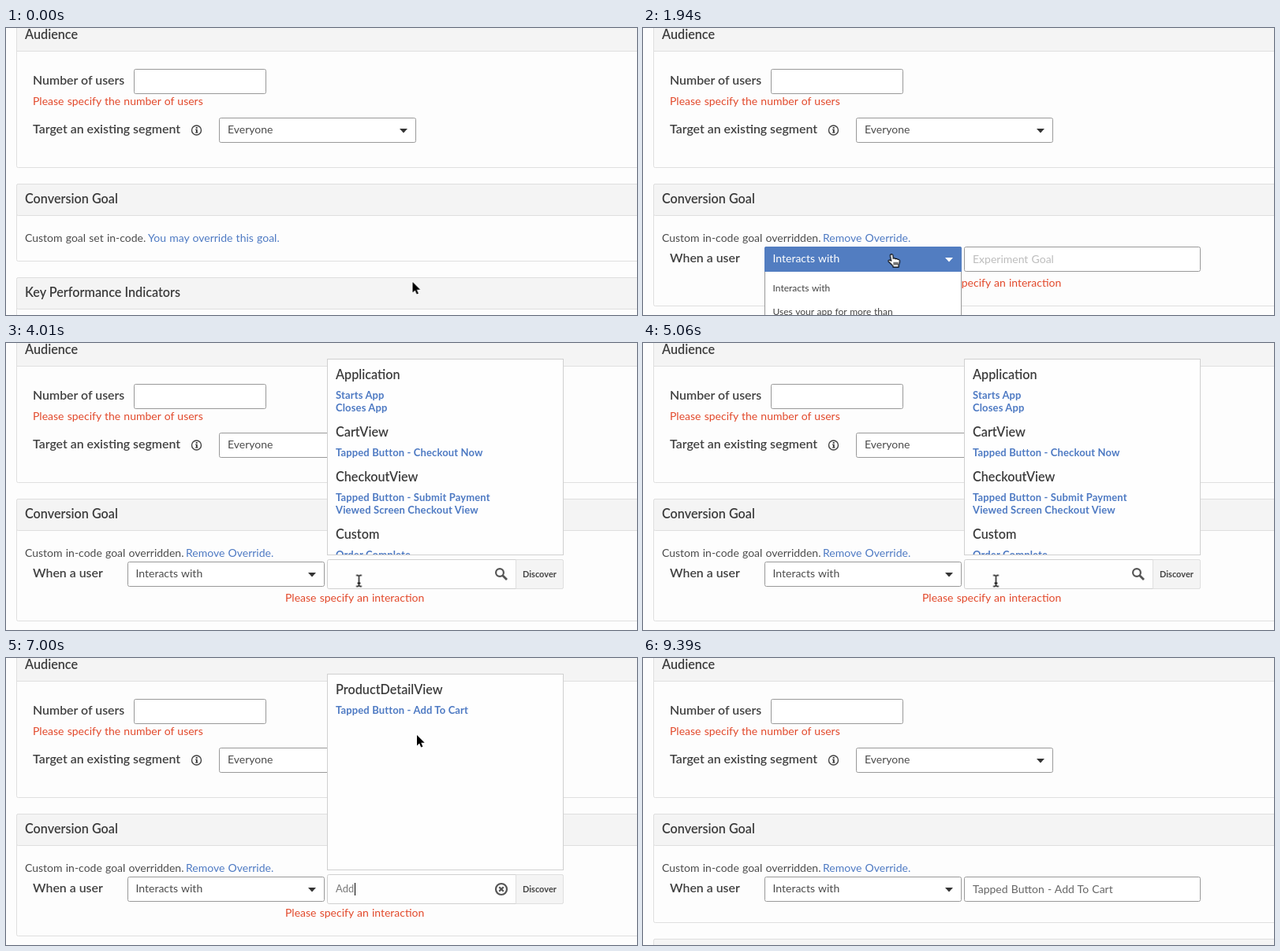
An HTML page for the animation above (9.8 s loop, 800 by 365 pixels).

```html
<!DOCTYPE html>
<html lang="en">
<head>
<meta charset="utf-8">
<title>Choosing a conversion goal</title>
<style>
html, body { margin: 0; width: 100%; height: 100%; overflow: hidden; background: #fdfdfd; }
svg { display: block; width: 800px; height: 365px; }

text { font: 14px Lato, "Open Sans", sans-serif; word-spacing: .6px; fill: #4c4c4c; white-space: pre; }
.head { font-size: 16.2px; font-weight: 600; word-spacing: 0; fill: #3c3c3c; }
.label { font-size: 15.9px; font-weight: 600; word-spacing: 0; fill: #404040; }
.error { fill: #e2492b; }
.link { fill: #4e7ac3; }
.hint { fill: #bdbdbd; }
.value { fill: #666; }
.item { font-size: 13px; font-weight: 700; letter-spacing: .14px; word-spacing: 0; fill: #4e7ac3; }
.option { font-size: 12px; fill: #444; }
.typed { font-size: 13px; fill: #777; }
.small { font-size: 11px; font-weight: 700; fill: #444; }
.panel { fill: #fdfdfd; stroke: #dfdfdf; }
.bar { fill: #f4f4f4; stroke: #dfdfdf; }
.box { fill: #fff; stroke: #999; }
.pop { fill: #fefefe; stroke: #d0d0d0; }
.ink { fill: #333; }
.icon { fill: none; stroke: #555; stroke-width: 2.2; }
.arrow path { fill: #000; stroke: #fff; stroke-width: 2; paint-order: stroke; stroke-linejoin: round; }

/* Everything changes in hard steps over one 9.8 s loop. */
.t, .m { animation: 9.8s step-end infinite; }
.t { opacity: 0; }

.prompt { animation-name: prompt; }
@keyframes prompt { 0% { opacity: 1 } 10.612% { opacity: 0 } }
.custom { animation-name: custom; }
@keyframes custom { 10.612% { opacity: 1 } 100% { opacity: 1 } }
.missing { animation-name: missing; }
@keyframes missing { 10.612% { opacity: 1 } 79.081% { opacity: 0 } }
.blank { animation-name: blank; }
@keyframes blank { 10.612% { opacity: 1 } 40.918% { opacity: 0 } }
.menu { animation-name: menu; }
@keyframes menu { 19.795% { opacity: 1 } 33.469% { opacity: 0 } }
.search { animation-name: search; }
@keyframes search { 40.918% { opacity: 1 } 77.551% { opacity: 0 } }
.all { animation-name: all; }
@keyframes all { 40.918% { opacity: 1 } 56.224% { opacity: 0 } }
.match { animation-name: match; }
@keyframes match { 56.224% { opacity: 1 } 77.551% { opacity: 0 } }
.lens { animation-name: lens; }
@keyframes lens { 40.918% { opacity: 1 } 53.163% { opacity: 0 } }
.clear { animation-name: clear; }
@keyframes clear { 53.163% { opacity: 1 } 77.551% { opacity: 0 } }
.type1 { animation-name: type1; }
@keyframes type1 { 53.163% { opacity: 1 } 54.693% { opacity: 0 } }
.type2 { animation-name: type2; }
@keyframes type2 { 54.693% { opacity: 1 } 59.285% { opacity: 0 } }
.type3 { animation-name: type3; }
@keyframes type3 { 59.285% { opacity: 1 } 77.551% { opacity: 0 } }
.caret { animation-name: caret; }
@keyframes caret {
  47.04% { opacity: 1; transform: none }
  51.632% { opacity: 0 }
  53.163% { opacity: 1; transform: translateX(8px) }
  54.693% { opacity: 1; transform: translateX(16px) }
  59.285% { opacity: 1; transform: translateX(24px) }
  77.551% { opacity: 0 }
}
.chosen { animation-name: chosen; }
@keyframes chosen { 77.551% { opacity: 1 } 100% { opacity: 1 } }

.goal { height: 98px; animation-name: goal; }
@keyframes goal { 10.612% { height: 155px } 79.081%, 100% { height: 138px } }
.kpi { animation-name: kpi; }
@keyframes kpi { 0% { transform: none } 10.612% { transform: translateY(57px) } 79.081%, 100% { transform: translateY(40px) } }

.over1 { animation-name: over1; }
@keyframes over1 { 4.489% { fill: #34598f } 10.612% { fill: #4e7ac3 } }
.over2 { animation-name: over2; }
@keyframes over2 { 10.612% { fill: #34598f } 18.265% { fill: #4e7ac3 } }
.over3 { animation-name: over3; }
@keyframes over3 { 72.959% { fill: #34598f } 77.551% { fill: #4e7ac3 } }

.arrow { animation-name: arrow; }
@keyframes arrow {
  0% { opacity: 1 } 4.489% { opacity: 0 }
  33.469% { opacity: 1 } 37.959% { opacity: 0 }
  66.938% { opacity: 1 } 72.959% { opacity: 0 }
  82.142% { opacity: 1 } 95.816% { opacity: 0 }
}
.hand { animation-name: hand; }
@keyframes hand {
  4.489% { opacity: 1 } 33.469% { opacity: 0 }
  72.959% { opacity: 1 } 82.142% { opacity: 0 }
}
.beam { animation-name: beam; }
@keyframes beam { 37.959% { opacity: 1 } 66.938% { opacity: 0 } }

.pointer { animation-name: pointer; }
@keyframes pointer {
  0% { transform: translate(515.5px, 323px) }
  1.53% { transform: translate(470px, 312px) }
  3.061% { transform: translate(380px, 287px) }
  4.489% { transform: translate(322px, 266px) }
  6.02% { transform: translate(310.5px, 263px) }
  16.734% { transform: translate(310.5px, 272px) }
  18.265% { transform: translate(310.5px, 287px) }
  25.918% { transform: translate(312px, 293px) }
  27.448% { transform: translate(312px, 304px) }
  28.877% { transform: translate(312px, 315px) }
  30.408% { transform: translate(312px, 320px) }
  33.469% { transform: translate(314px, 317.5px) }
  35% { transform: translate(335px, 316px) }
  36.428% { transform: translate(385px, 311px) }
  37.959% { transform: translate(435px, 304px) }
  39.489% { transform: translate(447.5px, 302.5px) }
  65.408% { transform: translate(450px, 295px) }
  66.938% { transform: translate(462px, 268px) }
  68.367% { transform: translate(480px, 215px) }
  69.897% { transform: translate(505px, 150px) }
  71.428% { transform: translate(521px, 98px) }
  72.959% { transform: translate(527px, 67px) }
  74.489% { transform: translate(527.5px, 61px) }
  82.142% { transform: translate(540px, 77px) }
  83.673% { transform: translate(575px, 124px) }
  85.204% { transform: translate(625px, 190px) }
  86.632% { transform: translate(664px, 244px) }
  88.163% { transform: translate(676.5px, 262px) }
  91.224% { transform: translate(683px, 267px) }
  92.755% { transform: translate(718px, 298px) }
  94.285%, 100% { transform: translate(770px, 344px) }
}
</style>
</head>
<body>
<svg viewBox="0 0 800 365">
  <defs>
    <path id="down" d="M0 0h10L5 5.5z"/>
    <path id="stem" d="M-3.5-7H-1.5L0-6 1.5-7H3.5M0-6V6M-3.5 7H-1.5L0 6 1.5 7H3.5M-2 3H2"/>
    <clipPath id="list"><path d="M408 21h298v248h-298z"/></clipPath>
  </defs>

  <!-- Audience -->
  <rect class="panel" x="13.5" y="-20.5" width="800" height="198" rx="2"/>
  <rect class="bar" x="13.5" y="-20.5" width="800" height="50"/>
  <text class="head" x="24" y="14">Audience</text>
  <text class="label" x="34" y="72">Number of users</text>
  <rect class="box" x="162.5" y="52.5" width="167" height="31" rx="2"/>
  <text class="error" x="34" y="98">Please specify the number of users</text>
  <text class="label" x="34" y="134">Target an existing segment</text>
  <circle cx="241.5" cy="130" r="6" fill="none" stroke="#444" stroke-width="1.4"/>
  <path class="ink" d="M240.7 126h2v1.8h-2zM240 128.8h2.7v3.7h.8v1H240v-1h.9v-2.7H240z"/>
  <rect class="box" x="270.5" y="114.5" width="249" height="31" rx="2"/>
  <text x="281" y="134">Everyone</text>
  <use class="ink" href="#down" x="499" y="128"/>

  <!-- Conversion goal -->
  <rect class="panel m goal" x="13.5" y="198.5" width="800" rx="2"/>
  <rect class="bar" x="13.5" y="198.5" width="800" height="40" rx="2"/>
  <text class="head" x="24" y="223">Conversion Goal</text>

  <g class="t prompt">
    <text x="24" y="272">Custom goal set in-code.</text>
    <text class="link m over1" x="180" y="272">You may override this goal.</text>
  </g>

  <g class="m kpi">
    <rect class="panel" x="13.5" y="317.5" width="800" height="100" rx="2"/>
    <rect class="bar" x="13.5" y="317.5" width="800" height="40" rx="2"/>
    <text class="head" x="24" y="342">Key Performance Indicators</text>
  </g>

  <g class="t custom">
    <text x="24" y="272">Custom in-code goal overridden.</text>
    <text class="link m over2" x="228" y="272">Remove Override.</text>
    <text class="label" x="34" y="298">When a user</text>
    <rect class="box" x="154.5" y="278.5" width="249" height="31" rx="2"/>
    <text x="164.5" y="298">Interacts with</text>
    <use class="ink" href="#down" x="383" y="292"/>
  </g>
  <text class="error t missing" x="354" y="329">Please specify an interaction</text>

  <g class="t blank">
    <rect class="box" x="407.5" y="278.5" width="299" height="31" rx="2"/>
    <text class="hint" x="418" y="299">Experiment Goal</text>
  </g>
  <g class="t chosen">
    <rect class="box" x="407.5" y="278.5" width="299" height="31" rx="2"/>
    <text class="value" x="418" y="299">Tapped Button - Add To Cart</text>
  </g>

  <g class="t menu">
    <rect class="box" x="154.5" y="309.5" width="249" height="80"/>
    <path fill="#527dc1" d="M156 278h246q2 0 2 2v30H154v-30q0-2 2-2z"/>
    <text x="164.5" y="298" style="fill:#fff">Interacts with</text>
    <use href="#down" x="383" y="292" fill="#fff"/>
    <text class="option" x="164.5" y="335">Interacts with</text>
    <text class="option" x="164.5" y="365">Uses your app for more than</text>
  </g>

  <!-- Goal search -->
  <g class="t search">
    <rect class="pop" x="407.5" y="20.5" width="299" height="249"/>
    <rect class="pop" x="407.5" y="275.5" width="299" height="37" rx="2"/>
    <path class="bar" d="M646.5 275.5h58q2 0 2 2v33q0 2-2 2h-58z"/>
    <text class="small" x="655" y="297.5">Discover</text>
  </g>
  <g class="t all" clip-path="url(#list)">
    <text class="head" x="418" y="46">Application</text>
    <text class="item" x="418" y="71">Starts App</text>
    <text class="item" x="418" y="87">Closes App</text>
    <text class="head" x="418" y="119">CartView</text>
    <text class="item" x="418" y="144">Tapped Button - Checkout Now</text>
    <text class="head" x="418" y="176">CheckoutView</text>
    <text class="item" x="418" y="201">Tapped Button - Submit Payment</text>
    <text class="item" x="418" y="217">Viewed Screen Checkout View</text>
    <text class="head" x="418" y="249">Custom</text>
    <text class="item" x="418" y="274">Order Complete</text>
  </g>
  <g class="t match">
    <text class="head" x="418" y="46">ProductDetailView</text>
    <text class="item m over3" x="418" y="71">Tapped Button - Add To Cart</text>
  </g>
  <g class="t lens icon">
    <circle cx="626" cy="292" r="4.9"/>
    <path d="M629.5 295.5l5.5 5.5" stroke-width="2.8"/>
  </g>
  <g class="t clear icon">
    <circle cx="628" cy="294" r="7"/>
    <path d="M625.2 291.2l5.6 5.6m0-5.6l-5.6 5.6"/>
  </g>
  <text class="typed t type1" x="418" y="298">A</text>
  <text class="typed t type2" x="418" y="298">Ad</text>
  <text class="typed t type3" x="418" y="298">Add</text>
  <rect class="t caret" x="418" y="286" width="1" height="16"/>

  <!-- Mouse pointer -->
  <g class="m pointer">
    <g class="t arrow">
      <path d="M0 0V13.5L3.1 10.6 5.2 15.6 7.4 14.7 5.3 9.8H9.7Z"/>
    </g>
    <g class="t hand" stroke="#000" stroke-width="1.1" stroke-linejoin="round">
      <g transform="scale(1.05)">
        <path fill="#fff" d="M3.2 1.2C4.3.1 5.8.6 6 2L6.6 6C7.5 5.2 9 5.4 9.3 6.5 10.2 5.8 11.5 6.1 11.8 7.1 13 6.6 14.3 7.4 14.2 9 14.1 11.5 13.5 12.5 13 14V16.3H6.2V15C4.5 13 3 11.6 1.2 10-.2 8.7 1.2 7 2.7 7.9L4 8.9 2.9 3C2.8 2.2 2.7 1.7 3.2 1.2Z"/>
        <path d="M7.5 10.3v3.5M9.5 10.3v3.5M11.5 10.3v3.5"/>
      </g>
    </g>
    <g class="t beam" fill="none">
      <use href="#stem" stroke="#fff" stroke-width="2.8"/>
      <use href="#stem" stroke="#000" stroke-width="1.4"/>
    </g>
  </g>
</svg>
</body>
</html>
```
